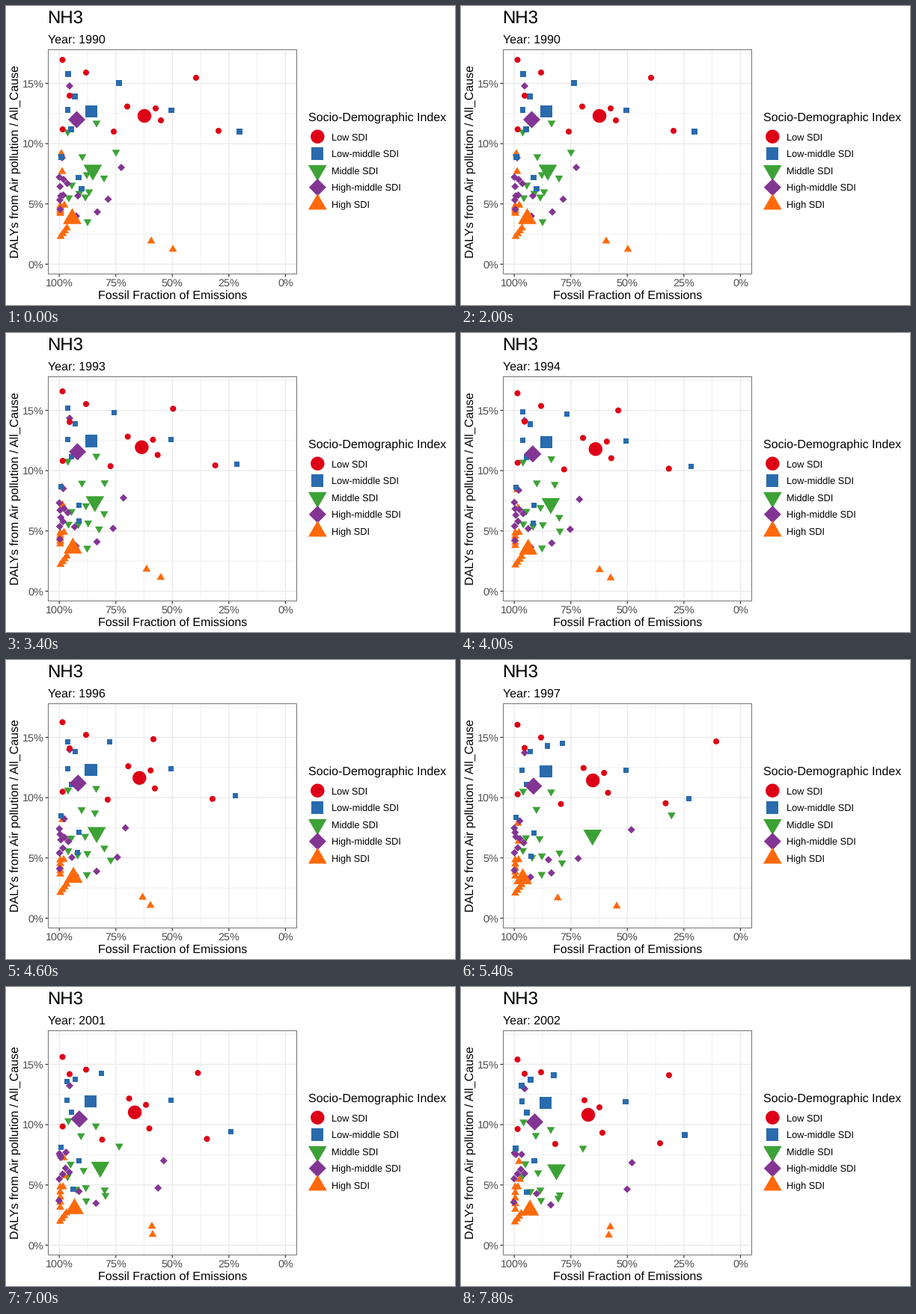
A matplotlib script for the animation above (8000 ms loop, 600 by 400 pixels).

```python
import numpy as np
import matplotlib.pyplot as plt
from matplotlib.animation import FuncAnimation
from matplotlib.collections import PolyCollection

plt.rcParams["font.family"] = "Liberation Sans"
plt.rcParams["text.hinting"] = "none"

FRAMES, STEP = 40, 200
PAUSE = 10                 # frames held on the first year
YEARS_PER_FRAME = 3 / 7
PX = 0.72                  # points per pixel at 100 dpi
SMALL, BIG = 4.0, 9.2


def group(drift, *starts, peak=0, dip=0):
    """Dots that share a drift; peak and dip push them sideways around 1997."""
    return [(np.array(s), np.array(drift), peak, dip) for s in starts]


def position(dot, k):
    start, drift, peak, dip = dot
    progress = max(0, k - PAUSE) / (FRAMES - 1 - PAUSE)
    spike = np.interp(k, [24, 26, 27, 31], [0, 1, 1, 0])
    slump = np.interp(k, [10, 24, 26, 27, 31, 39], [0, 1, 0, 0, 0.5, 0])
    return start + drift * progress + (peak * spike - dip * slump, 0)


def triangle(sign):
    r = 1.552
    w, h = r * np.sqrt(3) / 2, r * 0.75
    return np.array([(0, -sign * h), (w, sign * h), (-w, sign * h)])


turn = np.linspace(0, 2 * np.pi, 48, endpoint=False)
CIRCLE = np.column_stack([np.cos(turn), np.sin(turn)])
SQUARE = 0.886 * np.array([(-1, -1), (1, -1), (1, 1), (-1, 1)])
DIAMOND = 1.253 * np.array([(0, -1), (1, 0), (0, 1), (-1, 0)])

# The last dot of each series is its big average.
low = (
    group((0, 25), (75.5, 72), (107, 89), (75.7, 165))
    + group((-18, 42), (144, 168), (207, 153), (284, 167))
    + group((0, -4), (85, 120))
    + group((3, 17), (162, 134.5))
    + group((24, 22), (254, 96), peak=73, dip=73)
    + group((-15, 24), (200, 137), (185, 147))
)
low_middle = (
    group((1, 3), (92, 121), (87, 165), (97, 229.5))
    + group((-13, 30), (101, 244.5), (312, 168))
    + group((-27, 15), (151, 103))
    + group((-2, 41), (83, 91), peak=34)
    + group((-1, 14), (82.5, 139), (74, 202), (221, 139.5), (114, 141))
)
middle = (
    group((1, 12), (82.5, 170))
    + group((-1, 34), (121, 158))
    + group((-5, 23), (108, 227), (111, 250), (98, 252))
    + group((1, 48), (131, 231.5))
    + group((-2, -3), (102, 203), (88, 241), (84, 258), (109, 290))
    + group((16, 20), (147, 197), peak=125, dip=38)
    + group((24, 27), (106, 257), peak=15, dip=-25)
    + group((11.5, 25), (116, 223), peak=53)
)
high_middle = (
    group((0, 29), (85, 107))
    + group((6, 21), (75, 203))
    + [d for i in range(3)
       for d in group((0, -7 - 11.5 * i), (71.3 + i, 229 + 12.5 * i))]
    + group((3, 12), (77, 232), (82, 237.5))
    + group((-1, -3), (72, 259.5), (76.5, 253))
    + group((-2, 16), (72.5, 272), (94, 281), (122, 275.5))
    + group((74.5, 19), (154, 216), peak=30, dip=30)
    + group((5, 22.5), (96, 254), peak=18, dip=11)
    + group((85.5, 12), (136.5, 258.5), peak=-30, dip=28)
    + group((4, 28.5), (94.5, 152))
)
high = (
    group((3.5, 36), (74, 196), (75, 220))
    + group((-2, 1), (78, 265))
    + [d for i in range(5) for d in group((0, 5 * i), (72.5, 266 + 2.5 * i))]
    + group((-1, 6), *[(81.5 - 2.8 * i, 295.5 + 3.8 * i) for i in range(4)])
    + group((9, 12), (83, 285))
    + group((5.5, 6.5), (194, 313), peak=-68, dip=15)
    + group((-25.5, 6.5), (223, 324), dip=20)
    + group((3.5, 14), (88.5, 281), peak=-8)
)

# Name, colour, marker, drawing order of the small dots, dots.
SERIES = [
    ("Low SDI", "#de0016", CIRCLE, 9, low),
    ("Low-middle SDI", "#296bad", SQUARE, 8, low_middle),
    ("Middle SDI", "#3da236", triangle(-1), 5, middle),
    ("High-middle SDI", "#833593", DIAMOND, 7, high_middle),
    ("High SDI", "#ff690a", triangle(1), 6, high),
]

fig = plt.figure(figsize=(6, 4), dpi=100, facecolor="white")
ax = fig.add_axes([0, 0, 1, 1])
ax.set(xlim=(0, 600), ylim=(400, 0))
ax.axis("off")


def text(x, y, s, size, color="black", **kw):
    return ax.text(x, y, s, fontsize=size * PX, color=color, va="baseline", **kw)


def line(xs, ys, color, width, z=1):
    ax.plot(xs, ys, color=color, lw=width * PX, zorder=z,
            solid_capstyle="butt", solid_joinstyle="miter", snap=False)


def shape_group(color, z):
    shapes = PolyCollection([], facecolors=color, edgecolors="none",
                            linewidths=0, zorder=z)
    ax.add_collection(shapes, autolim=False)
    return shapes


LEFT, RIGHT, TOP, BOTTOM = 56.5, 388.5, 58.5, 358.5
GRID, TICK, LABEL = "#ebebeb", "#333333", "#4d4d4d"

for i in range(5):
    x = 71.2 + 75.55 * i
    line([x, x], [TOP, BOTTOM], GRID, 1.4, 2)
    line([x, x], [BOTTOM, BOTTOM + 4], TICK, 1.2, 2)
    text(x, 375, f"{100 - 25 * i}%", 14.4, LABEL, ha="center")
    if i < 4:
        line([x + 37.8] * 2, [TOP, BOTTOM], GRID, 0.7)
for i in range(4):
    y = 345.4 - 80.63 * i
    line([LEFT, RIGHT], [y, y], GRID, 1.4, 2)
    line([LEFT - 4, LEFT], [y, y], TICK, 1.2, 2)
    text(50.5, y + 5, f"{5 * i}%", 14.4, LABEL, ha="right")
    line([LEFT, RIGHT], [y - 40.3] * 2, GRID, 0.7)
line([LEFT, RIGHT, RIGHT, LEFT, LEFT], [TOP, TOP, BOTTOM, BOTTOM, TOP], "#747474", 1, 20)

text(55.5, 24, "NH3", 24)
year = text(55.5, 50, "", 16)
text(222.5, 392, "Fossil Fraction of Emissions", 16, ha="center")
text(17, 208.5, "DALYs from Air pollution / All_Cause", 16,
     rotation=90, rotation_mode="anchor", ha="center")
text(404.5, 154, "Socio-Demographic Index", 16)

layers = []
for i, (name, color, shape, order, dots) in enumerate(SERIES):
    y = 174.7 + 22.65 * i
    # Triangles hang from their centroid, so centre their boxes accordingly.
    shift = -(shape[:, 1].mean())
    key = shape_group(color, 5 + 0.1 * i)
    key.set_verts([(shape + (0, shift)) * BIG + (416.3, y)])
    text(435, y + 5, name, 12.8)
    layers.append((shape_group(color, order), shape_group(color, 12 + i), shape, dots))


def draw(k):
    year.set_text(f"Year: {round(1990 + YEARS_PER_FRAME * max(0, k - PAUSE))}")
    for small, big, shape, dots in layers:
        spots = [position(d, k) for d in dots]
        small.set_verts([shape * SMALL + p for p in spots[:-1]])
        big.set_verts([shape * BIG + spots[-1]])
    return [year]


anim = FuncAnimation(fig, draw, frames=FRAMES, interval=STEP, repeat=True,
                     repeat_delay=0, init_func=lambda: draw(0))
plt.show()
```
